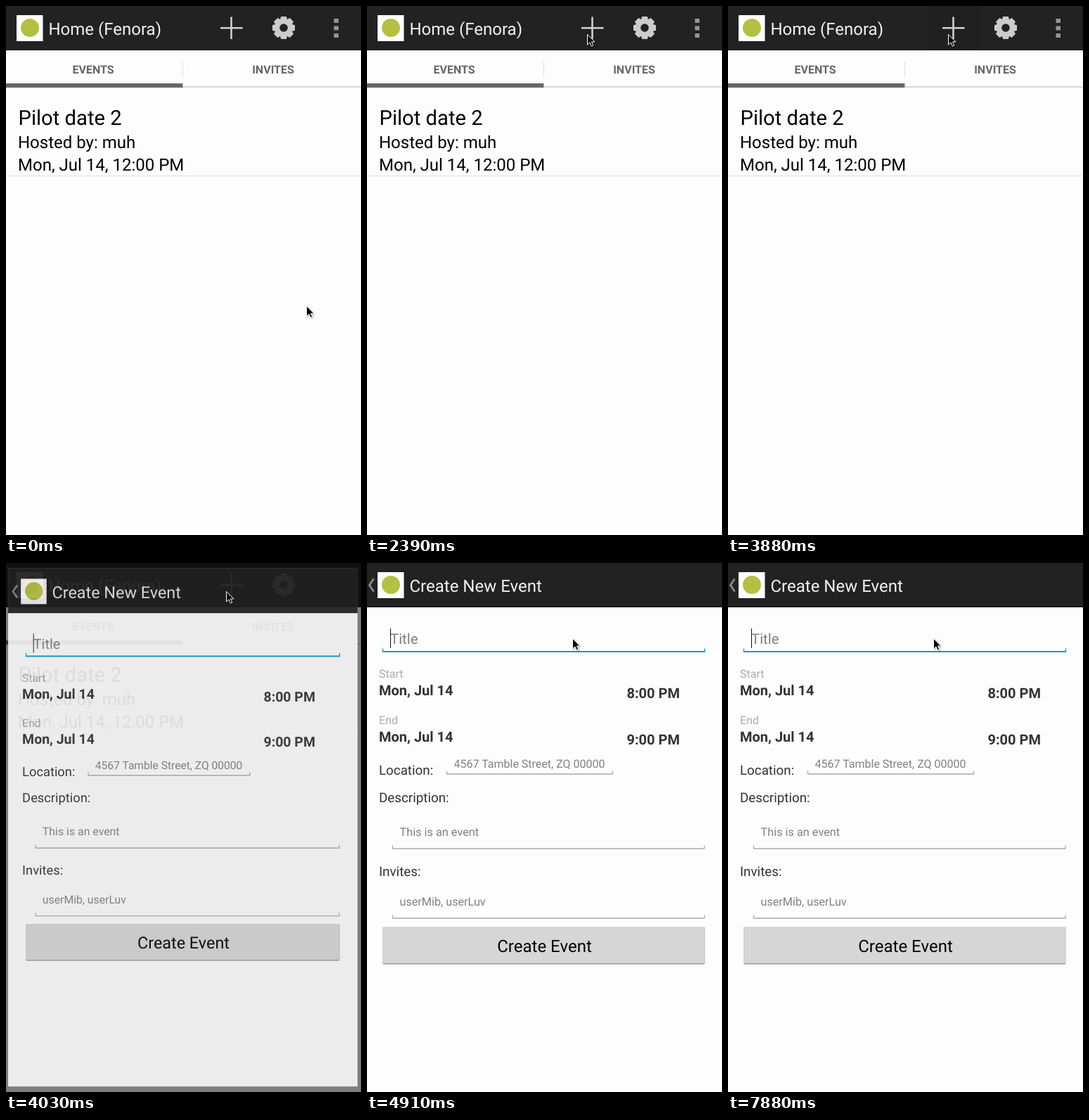
Recreate the animation shown at these times as an HTML page. Size 505 by 752 pixels, loop 8000 ms.

```html
<!DOCTYPE html>
<html lang="en">
<head>
<meta charset="utf-8">
<title>Event planner</title>
<style>
  html, body { margin: 0; width: 100%; height: 100%; overflow: hidden; background: #fdfdfd; }
  svg { display: block; width: 505px; height: 752px; }
  text { font-family: Roboto, "Noto Sans", sans-serif; white-space: pre; text-rendering: geometricPrecision; }
  #pointer { filter: drop-shadow(1px 1.5px 1px rgba(0, 0, 0, .35)); }
</style>
</head>
<body>
<svg id="stage" viewBox="0 0 505 752" xmlns="http://www.w3.org/2000/svg">
  <g id="home"></g>
  <rect id="dim" width="505" height="752" fill="#000" opacity=".5"/>
  <g id="form"></g>
  <path id="pointer" d="M.5 .3V15L4 11.9L6.4 17.1L8.8 16L6.5 11H11Z" fill="#000" stroke="#fff" stroke-width="1" stroke-linejoin="round"/>
</svg>
<script>
const LOOP = 8000;
const SVG = "http://www.w3.org/2000/svg";
const $ = id => document.getElementById(id);

function add(parent, tag, attrs, content) {
  const node = document.createElementNS(SVG, tag);
  for (const key in attrs) node.setAttribute(key, attrs[key]);
  if (content) node.textContent = content;
  parent.appendChild(node);
  return node;
}

const rect = (g, x, y, width, height, fill) => add(g, "rect", { x, y, width, height, fill });

const label = (g, x, y, size, fill, content, more) =>
  add(g, "text", { x, y, "font-size": size, fill, ...more }, content);

const bold = { "font-weight": 700 };
const middle = { "text-anchor": "middle" };

// Page and action bar reach slightly past the stage, which shows when scaled down.
function page(g, title) {
  rect(g, -3.6, -2, 510.3, 756, "#fdfdfd");
  rect(g, -3.6, -2, 510.3, 65, "#222");
  rect(g, -3.6, 62, 510.3, 1, "#111");
  rect(g, 15, 13, 37.5, 37, "#fff");
  add(g, "circle", { cx: 34, cy: 31, r: 13, fill: "#b4c044" });
  label(g, 60.5, 41, 24, "#f2f2f2", title);
}

function gear(g, cx, cy) {
  const icon = add(g, "g", { transform: `translate(${cx} ${cy})`, fill: "#ccc" });
  add(icon, "circle", { r: 9.3, fill: "none", stroke: "#ccc", "stroke-width": 7 });
  for (let i = 0; i < 8; i++) {
    add(icon, "path", { d: "M-5.2 -11L-3.8 -16H3.8L5.2 -11Z", transform: `rotate(${i * 45})` });
  }
}

function field(g, x1, x2, y, color, width) {
  const tick = y - 4.5;
  add(g, "path", {
    d: `M${x1 + .5} ${tick}V${y}M${x2 - .5} ${tick}V${y}`, stroke: color, "stroke-width": 1.3
  });
  add(g, "path", { d: `M${x1} ${y}H${x2}`, stroke: color, "stroke-width": width });
}

function buildHome(g) {
  page(g, "Home (Fenora)");
  const press = rect(g, 283, 0, 75, 62, "#000");
  add(g, "path", { d: "M305 31.2H336.5M320.5 15.5V47", stroke: "#d0d0d0", "stroke-width": 2.6 });
  gear(g, 395, 31);
  const dots = add(g, "g", {});
  for (const y of [18, 28.5, 39]) rect(dots, 466.5, y, 6.5, 6, "#949494");

  label(g, 124, 96, 16, "#666", "EVENTS", { ...bold, ...middle });
  label(g, 380, 96, 16, "#666", "INVITES", { ...bold, ...middle });
  rect(g, 251, 79, 1, 22, "#ddd");
  rect(g, 251, 114, 256, 2, "#d9d9d9");
  rect(g, -3.6, 110, 255, 6, "#666");

  label(g, 17.5, 169, 29.2, "#000", "Pilot date 2");
  label(g, 17, 202, 24, "#000", "Hosted by: muh");
  label(g, 17, 234, 24, "#000", "Mon, Jul 14, 12:00 PM");
  rect(g, 0, 241, 505, 1, "#e0e0e0");
  return { press, dots };
}

function buildForm(g) {
  page(g, "Create New Event");
  add(g, "path", { d: "M9.5 22.5L3.5 31.5L9.5 40.5", fill: "none", stroke: "#8c8c8c", "stroke-width": 2.8 });

  label(g, 33, 115, 20.4, "#808080", "Title");
  field(g, 22, 481, 126, "#0c9acb", 2.2);
  const caret = rect(g, 33, 93, 1, 28, "#111");

  [["Start", "8:00 PM", 163], ["End", "9:00 PM", 228.7]].forEach(([name, hour, y]) => {
    label(g, 17, y, 16, "#aaa", name);
    label(g, 17, y + 25.3, 20, "#333", "Mon, Jul 14", bold);
    label(g, 369.5, y + 29, 20, "#333", hour, bold);
  });

  label(g, 17, 301, 18.8, "#333", "Location:");
  label(g, 123.5, 290.5, 16, "#808080", "4567 Tamble Street, ZQ 00000");
  field(g, 113, 350, 300, "#aaa", 1.4);

  label(g, 17, 339.5, 18.8, "#333", "Description:");
  label(g, 46.5, 387.5, 16.3, "#808080", "This is an event");
  field(g, 36, 480.5, 406, "#aaa", 1.4);

  label(g, 17, 445, 18.8, "#333", "Invites:");
  label(g, 46.5, 487, 16.2, "#808080", "userMib, userLuv");
  field(g, 36, 480.5, 505, "#aaa", 1.4);

  add(g, "rect", { x: 22.5, y: 517, width: 458, height: 53.5, rx: 1.5, fill: "#999" });
  add(g, "rect", { x: 22.5, y: 517, width: 458, height: 52, rx: 1.5, fill: "#d6d6d6" });
  label(g, 252.5, 552.5, 24, "#000", "Create Event", middle);
  return { caret };
}

// [start, x, y]: each place holds until the next.
const pointerPath = [
  [0, 427, 426], [1200, 426, 358], [1350, 418, 136], [1500, 420, 102],
  [1650, 447, 65], [1800, 456, 50], [1950, 399, 66], [2100, 353, 62],
  [2240, 318, 50], [2390, 313, 40], [4470, 300, 69], [4610, 296, 119],
  [4760, 292, 107]
];
const pressSteps = [[0, 0], [3730, .12], [3880, .06], [4030, 0]];
const caretSteps = [
  [0, 1], [4470, 0], [4910, 1], [5350, 0], [5950, 1], [6390, 0], [6840, 1], [7440, 0], [7880, 1]
];
const OPENING = 4030, OPEN = 4170;

const at = (steps, t) => steps.filter(step => step[0] <= t).pop();
const show = (node, visible) => node.setAttribute("display", visible ? "inline" : "none");

const { press, dots } = buildHome($("home"));
const { caret } = buildForm($("form"));

function render(t) {
  const opening = t >= OPENING && t < OPEN;
  const scale = opening ? .974 : 1;
  show($("home"), t < OPEN);
  show(dots, t < OPENING);
  show($("dim"), opening);
  show($("form"), t >= OPENING);
  $("form").setAttribute("opacity", opening ? .87 : 1);
  $("form").setAttribute("transform",
    `translate(${252.5 * (1 - scale)} ${376 * (1 - scale)}) scale(${scale})`);
  press.setAttribute("opacity", at(pressSteps, t)[1]);
  show(caret, at(caretSteps, t)[1]);
  const [, x, y] = at(pointerPath, t);
  $("pointer").setAttribute("transform", `translate(${x} ${y})`);
}

const begin = performance.now();
function tick() {
  render((performance.now() - begin) % LOOP);
  requestAnimationFrame(tick);
}
tick();
</script>
</body>
</html>
```
